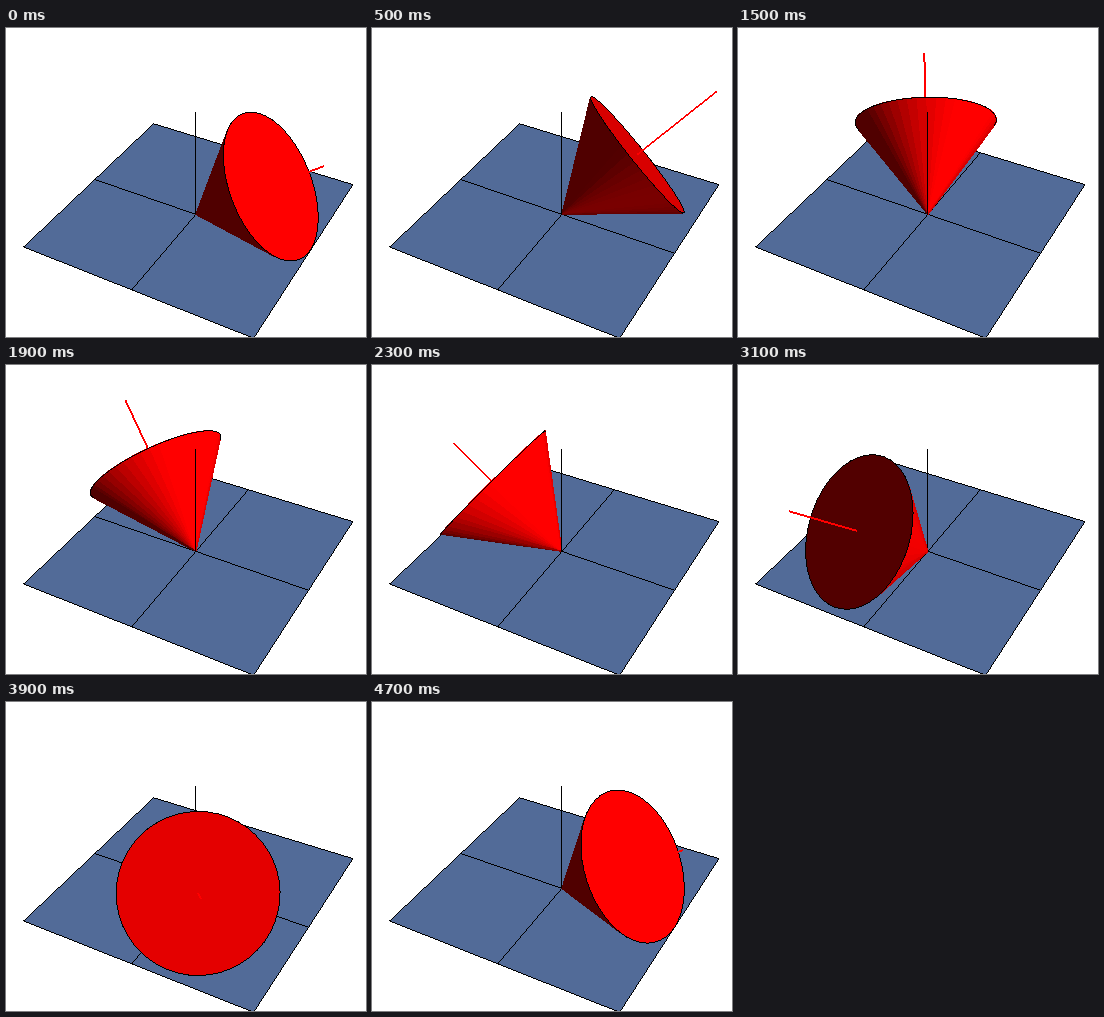
A matplotlib script for the animation above (4800 ms loop, 360 by 309 pixels).

```python
import matplotlib.pyplot as plt
import numpy as np
from matplotlib.animation import FuncAnimation
from matplotlib.collections import PolyCollection
from matplotlib.patches import Polygon

W, H, DPI = 360, 309, 100
FRAMES, INTERVAL = 48, 100

# Camera: looks at the centre of the box [-1, 1] x [-1, 1] x [0, 1]
CENTRE = np.array([0, 0, 0.5])
EYE = CENTRE + 2 * np.array([1.3, -2.4, 2.0])
DIST = np.linalg.norm(EYE - CENTRE)
VIEW = (EYE - CENTRE) / DIST
RIGHT = np.cross([0, 0, 1], VIEW)
RIGHT /= np.linalg.norm(RIGHT)
UP = np.cross(VIEW, RIGHT)
FOCAL = 856
MID_X, MID_Y = 189.9, 137.5

# Cone with slant height 1, rolling on the floor about its apex
HEIGHT, RADIUS = 0.8, 0.6
SIDES = 48
PHI = np.linspace(0, 2 * np.pi, SIDES + 1)
LIGHT = (RIGHT + VIEW) / np.sqrt(2)


def project(points):
    p = np.asarray(points, float) - CENTRE
    scale = FOCAL / (DIST - p @ VIEW)
    return np.stack([MID_X + scale * (p @ RIGHT),
                     MID_Y - scale * (p @ UP)], axis=-1)


def shade(normals):
    red = np.clip((80 + 205 * np.maximum(0, normals @ LIGHT)) / 255, 0, 1)
    return np.stack([red, 0 * red, 0 * red], axis=-1)


def pixels(a, b, width=1):
    """Whole-pixel boxes along the segment a-b, for crisp lines."""
    major = int(abs(b[1] - a[1]) > abs(b[0] - a[0]))
    if a[major] > b[major]:
        a, b = b, a
    step = np.arange(np.floor(a[major]), np.floor(b[major]) + 1)
    across = np.interp(step + 0.5, [a[major], b[major]],
                       [a[1 - major], b[1 - major]])
    corner = np.empty((len(step), 1, 2))
    corner[:, 0, major] = step
    corner[:, 0, 1 - major] = np.round(across - width / 2)
    size = np.ones(2)
    size[1 - major] = width
    return corner + size * [(0, 0), (1, 0), (1, 1), (0, 1)]


fig = plt.figure(figsize=(W / DPI, H / DPI), dpi=DPI, facecolor="white")
ax = fig.add_axes([0, 0, 1, 1])
ax.set_xlim(0, W)
ax.set_ylim(H, 0)
ax.axis("off")


def add_polys(verts=(), color="black", z=1, **style):
    art = PolyCollection(verts, facecolors=color, linewidths=0, zorder=z,
                         snap=False, **style)
    ax.add_collection(art, autolim=False)
    return art


def line(a, b, **style):
    return add_polys(pixels(*project([a, b])), **style)


corners = [(-1, 1, 0), (1, 1, 0), (1, -1, 0), (-1, -1, 0)]
ax.add_patch(Polygon(project(corners), fc="#526b98", lw=0, zorder=0))
for a, b in zip(corners, corners[1:] + corners[:1]):
    line(a, b)
line((-1, 0, 0), (1, 0, 0))
line((0, -1, 0), (0, 1, 0))
pole = line((0, 0, 0), (0, 0, 1))

rod = add_polys(color="red")
side = add_polys(z=4, antialiaseds=False)
base = ax.add_patch(Polygon(project(corners), lw=0, zorder=5))
rim = add_polys(z=6)


def update(frame):
    turn = 2 * np.pi * (frame + 1) / FRAMES
    c, s = np.cos(turn), np.sin(turn)
    axis = np.array([HEIGHT * c, HEIGHT * s, RADIUS])
    across = np.array([-s, c, 0])
    lift = np.cross(axis, across)
    centre = HEIGHT * axis

    def spoke(phi):
        return np.outer(np.cos(phi), across) + np.outer(np.sin(phi), lift)

    normals = HEIGHT * spoke((PHI[:-1] + PHI[1:]) / 2) - RADIUS * axis
    front = normals @ EYE > 0
    base_seen = axis @ (EYE - centre) > 0

    edge = project(centre + RADIUS * spoke(PHI))
    apex = np.broadcast_to(project([0, 0, 0]), (SIDES, 2))
    side.set_verts(np.stack([apex, edge[:-1], edge[1:]], axis=1)[front])
    side.set_facecolor(shade(normals[front]))

    base.set_visible(base_seen)
    base.set_xy(edge)
    base.set_facecolor(shade(axis))
    arcs = np.stack([edge[:-1], edge[1:]], axis=1)[front | base_seen]
    rim.set_verts(np.concatenate([pixels(*arc) for arc in arcs]))

    # The rod is cut off at the walls of the box
    reach = min(2 * HEIGHT, 1 / (HEIGHT * max(abs(c), abs(s))))
    rod.set_verts(pixels(*project([centre, reach * axis]), width=2))
    rod.set_zorder(7 if base_seen else 3)
    pole.set_zorder(2 if axis[:2] @ EYE[:2] > 0 else 8)
    return side, rim, base, rod, pole


anim = FuncAnimation(fig, update, frames=FRAMES, interval=INTERVAL,
                     repeat=True, repeat_delay=0, blit=False)
plt.show()
```
